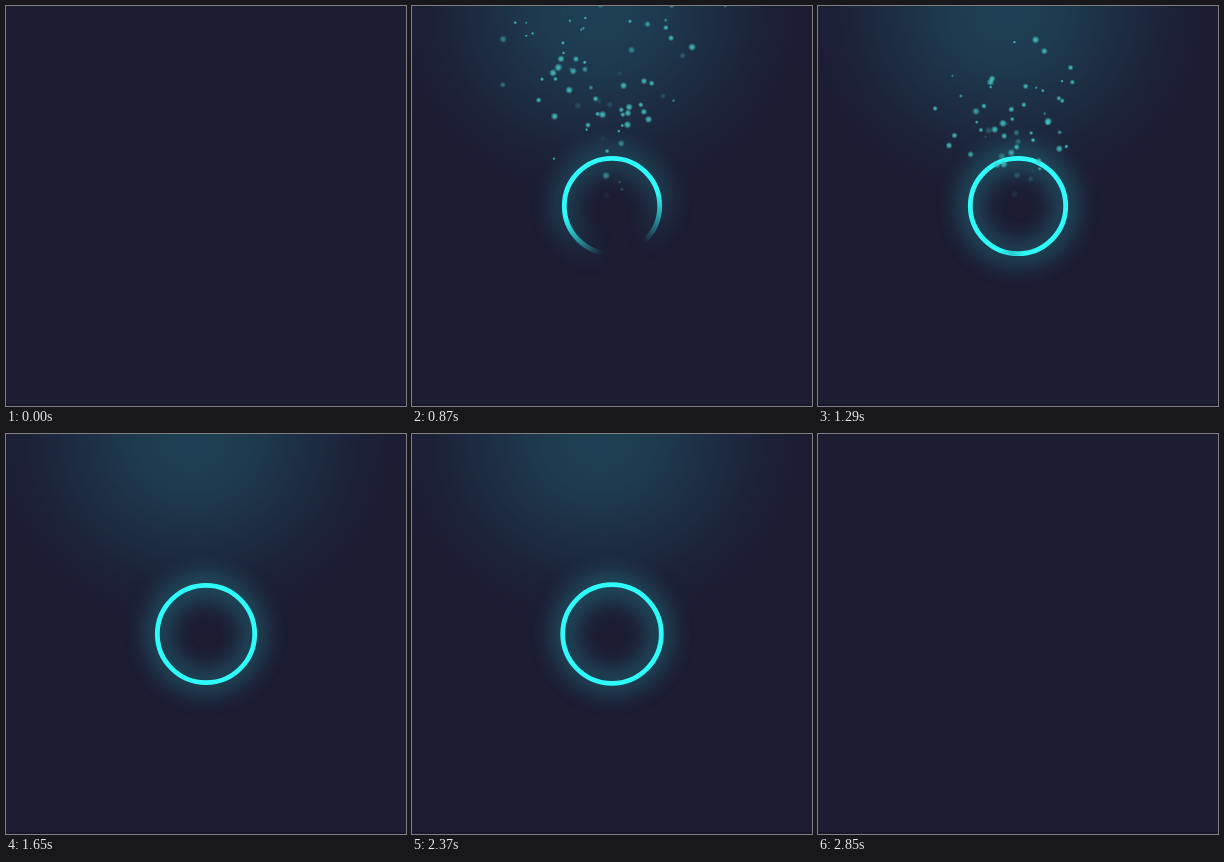
These frames come from a looping animation (400 px wide and 400 px high, 2.88 s). An HTML page with a canvas:

```html
<!DOCTYPE html>
<html>
<head>
<meta charset="utf-8">
<style>
  html, body { margin: 0; height: 100%; overflow: hidden; background: #1c1c33; }
  canvas { display: block; width: 100vw; height: 100vh; }
</style>
</head>
<body>
<canvas id="stage" width="400" height="400"></canvas>
<script>
const ctx = document.getElementById('stage').getContext('2d');
const LOOP = 2880, STEP = 30, C = 200, DEG = Math.PI / 180;
const clamp = v => Math.max(0, Math.min(1, v));
const cyan = a => `rgba(46,252,250,${a})`;

let seed = 7;
const rnd = (lo = 0, hi = 1) => {
  seed = (seed * 16807) % 2147483647;
  return lo + (hi - lo) * seed / 2147483647;
};

// Sparks appear ever more often near the top and speed up towards the ring's centre
const sparks = Array.from({ length: 140 }, () => {
  const born = 60 + 1000 * Math.sqrt(rnd());
  return {
    born,
    end: Math.min(1430, born + rnd(300, 600)),
    x: C - 10 + (rnd(-1, 1) + rnd(-1, 1)) * 75,
    y: rnd(-10, 110),
    travel: rnd(0.3, 1),
    r: rnd(1.5, 4.3)
  };
});

function drawSparks(t) {
  for (const s of sparks) {
    const a = clamp(Math.min((t - s.born) / 90, (s.end - t) / 90));
    if (!a) continue;
    const k = s.travel * ((t - s.born) / (s.end - s.born)) ** 2;
    const x = s.x + (C - s.x) * k, y = s.y + (C - s.y) * k;
    const g = ctx.createRadialGradient(x, y, 0, x, y, s.r);
    g.addColorStop(0, `rgba(70,205,200,${0.9 * a})`);
    g.addColorStop(0.4, `rgba(66,195,195,${0.75 * a})`);
    g.addColorStop(1, 'rgba(60,180,185,0)');
    ctx.fillStyle = g;
    ctx.fillRect(x - s.r, y - s.r, 2 * s.r, 2 * s.r);
  }
}

function drawBeam(strength) {
  const R = 205;
  ctx.save();
  ctx.translate(187, 5);
  ctx.scale(1.08, 1);
  const g = ctx.createRadialGradient(0, 0, 0, 0, 0, R);
  for (let p = 0; p <= 1; p += 0.125)
    g.addColorStop(p, `rgba(40,250,250,${0.16 * strength * (1 + Math.cos(p * Math.PI)) / 2})`);
  ctx.fillStyle = g;
  ctx.fillRect(-R, -R, 2 * R, 2 * R);
  ctx.restore();
}

// Two beats, each quick at the start of both the swell and the return
function pulse(t) {
  if (t < 1620 || t >= 2490) return 0;
  const p = ((t - 1620) % 435) / 217.5;
  const out = Math.sin((p % 1) * Math.PI / 2);
  return 4.5 * (p < 1 ? out : 1 - out);
}

// The lit arc grows both ways from the upper left, with long soft ends
function drawRing(t) {
  if (t <= 480) return;
  const reach = 5.75 * (t - 480) ** 0.55;
  const mid = 227 + 50 * clamp((t - 600) / 480);
  const paint = ctx.createConicGradient((mid + 180) * DEG, C, C);
  for (let d = -180; d <= 180; d += 5)
    paint.addColorStop((d + 180) / 360, cyan(clamp((reach - Math.abs(d)) / 65)));
  const circle = (r, width) => {
    ctx.strokeStyle = paint;
    ctx.lineWidth = width;
    ctx.beginPath();
    ctx.arc(C, C, r, 0, 2 * Math.PI);
    ctx.stroke();
  };
  ctx.save();
  ctx.filter = 'blur(13px)';
  ctx.globalAlpha *= 0.55 * clamp(reach / 190);
  circle(49, 9);
  ctx.restore();
  circle(47.7 + pulse(t), 4.8);
}

function draw(now) {
  const t = Math.floor((now % LOOP) / STEP) * STEP;
  ctx.globalAlpha = 1;
  ctx.fillStyle = '#1c1c33';
  ctx.fillRect(0, 0, 400, 400);
  ctx.fillStyle = '#19172d';
  ctx.fillRect(0, 398, 400, 2);
  ctx.globalAlpha = clamp((2850 - t) / 240);
  drawBeam(clamp((t - 30) / 620));
  drawRing(t);
  drawSparks(t);
}

let start;
function frame(now) {
  start ??= now;
  draw(now - start);
  requestAnimationFrame(frame);
}
draw(0);
requestAnimationFrame(frame);
</script>
</body>
</html>
```
